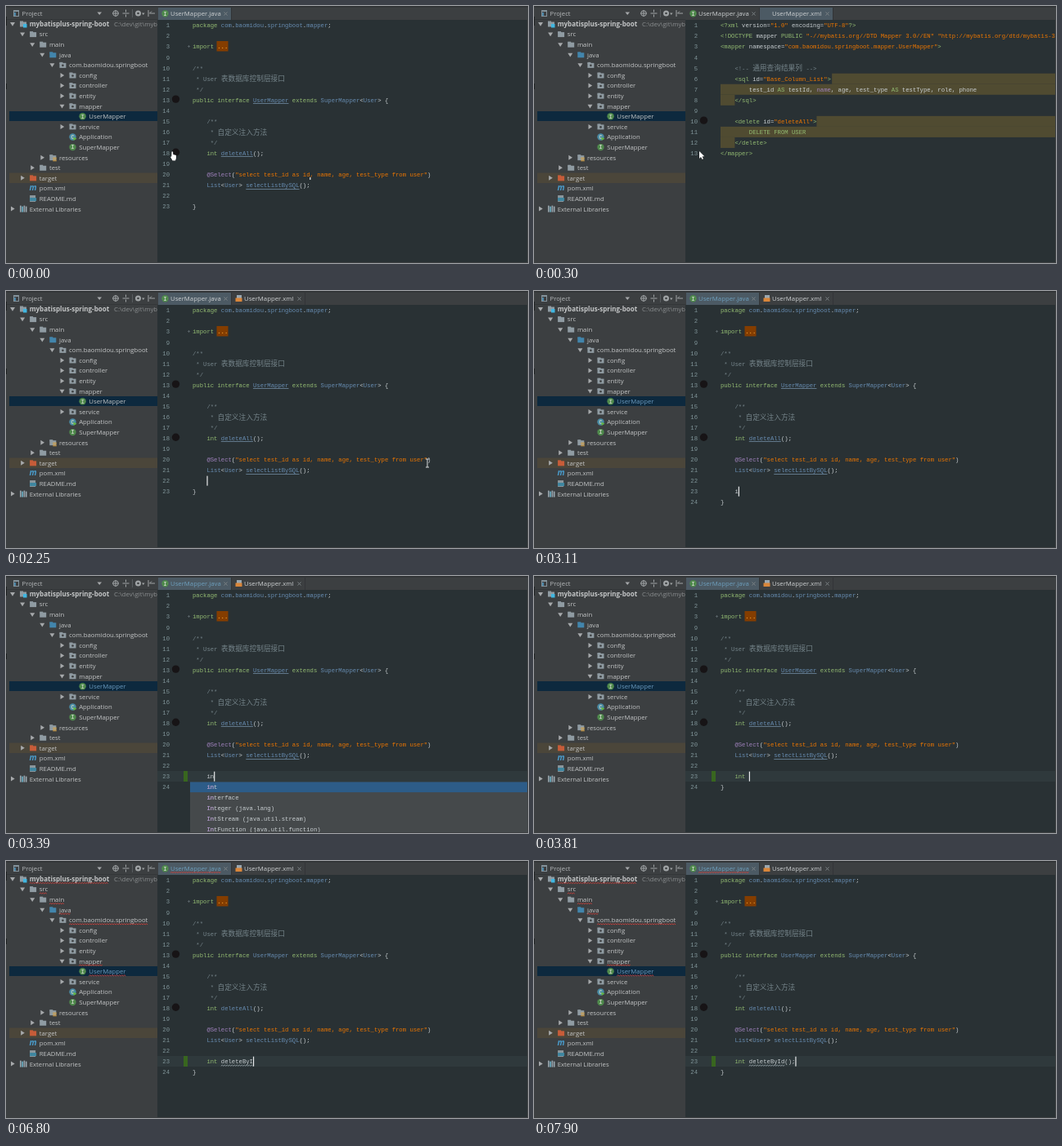
These frames come from a looping animation (638x315 px, 8000 ms). An HTML page with a canvas:

```html
<!DOCTYPE html>
<html lang="en">
<head>
<meta charset="utf-8">
<style>
html, body { margin: 0; width: 100%; height: 100%; overflow: hidden; background: #293134; }
canvas { display: block; }
</style>
</head>
<body>
<canvas id="stage" width="638" height="315"></canvas>
<script>
const ctx = document.getElementById('stage').getContext('2d');
const LOOP = 8000, CHAR = 4.35, LEFT = 228, ROW = 13.04, TREE_ROW = 12.59;
const MONO = '7.25px "Liberation Mono", monospace';
const CJK = '8.7px "Noto Sans CJK SC", "Noto Sans CJK", sans-serif';
const UI = '7.75px "Open Sans", sans-serif';
const UI_BOLD = 'bold 8px "Open Sans", sans-serif';
const COLORS = { w: '#c9cfd2', k: '#93bb72', s: '#ec7600', c: '#75848a', a: '#a082bd', g: '#81969a', t: '#678cb1' };

// "§x" switches to colour x
const JAVA = [
  '§kpackage §tcom§w.§tbaomidou§w.§tspringboot§w.§tmapper§w;', '', '§kimport', '',
  '§c/**', '§c * User 表数据库控制层接口', '§c */',
  '§kpublic interface §tUserMapper §kextends §tSuperMapper§w<§tUser§w> {', '',
  '§c    /**', '§c     * 自定义注入方法', '§c     */',
  '§k    int §tdeleteAll§w();', '',
  '§a    @Select§w(§s"select test_id as id, name, age, test_type from user"§w)',
  '§t    List§w<§tUser§w> §tselectListBySQL§w();', ''
];
const XML = [
  '§k<?xml§w version=§s"1.0"§w encoding=§s"UTF-8"§k?>',
  '§k<!DOCTYPE§w mapper §kPUBLIC §s"-//mybatis.org//DTD Mapper 3.0//EN" "http://mybatis.org/dtd/mybatis-3-mapper.dtd"§k>',
  '§k<mapper§w namespace=§s"com.baomidou.springboot.mapper.UserMapper"§k>', '',
  '§c    <!-- 通用查询结果列 -->',
  '§k    <sql§w id=§s"Base_Column_List"§k>',
  '§w        test_id §kAS§w testId, §aname§w, age, test_type §kAS§w testType, role, phone',
  '§k    </sql>', '',
  '§k    <delete§w id=§s"deleteAll"§k>',
  '§k        DELETE FROM USER',
  '§k    </delete>', '§k</mapper>'
];
// name, depth, arrow (v open, > closed), icon
const TREE = [
  ['mybatisplus-spring-boot', 0, 'v', 'module'], ['src', 1, 'v', 'folder'], ['main', 2, 'v', 'folder'],
  ['java', 3, 'v', 'source'], ['com.baomidou.springboot', 4, 'v', 'package'], ['config', 5, '>', 'package'],
  ['controller', 5, '>', 'package'], ['entity', 5, '>', 'package'], ['mapper', 5, 'v', 'package'],
  ['UserMapper', 6, '', 'interface'], ['service', 5, '>', 'package'], ['Application', 5, '', 'class'],
  ['SuperMapper', 5, '', 'interface'], ['resources', 3, '>', 'resources'], ['test', 2, '>', 'folder'],
  ['target', 1, '>', 'target'], ['pom.xml', 1, '', 'maven'], ['README.md', 1, '', 'markdown'],
  ['External Libraries', 0, '>', 'library']
];
const BROKEN_ROWS = [0, 1, 2, 3, 4, 8, 9];

const TYPED = [
  [0, ''], [3110, 'i'], [3390, 'in'], [3540, 'int'], [3810, 'int '], [4080, 'int d'], [4210, 'int de'],
  [4360, 'int del'], [4520, 'int dele'], [4660, 'int delet'], [4780, 'int delete'], [4940, 'int deleteB'],
  [5470, 'int delete'], [5900, 'int deleteB'], [6280, 'int deleteBy'], [6680, 'int deleteByI'],
  [7100, 'int deleteById'], [7510, 'int deleteById()'], [7900, 'int deleteById();']
];
const POINTER = [
  [0, 'hand', 201, 178], [150, 'arrow', 202, 178], [690, 'arrow', 202, 166], [810, 'arrow', 202, 149],
  [930, 'hand', 201, 136], [1330, 'beam', 290, 167], [1460, 'beam', 390, 187], [1590, 'beam', 475, 202],
  [1710, 'beam', 515, 211], [2810, 'none', 0, 0]
];
const at = (steps, t) => steps.filter(s => s[0] <= t).pop();

const rowY = row => 24 + row * ROW;
const colX = col => LEFT + col * CHAR;

function rect(color, x, y, w, h) {
  ctx.fillStyle = color;
  ctx.fillRect(x, y, w, h);
}
function text(str, x, y, color, font = UI, align = 'left') {
  ctx.font = font;
  ctx.fillStyle = color;
  ctx.textAlign = align;
  ctx.fillText(str, x, y);
}
function disc(color, x, y, r) {
  ctx.fillStyle = color;
  ctx.beginPath();
  ctx.arc(x, y, r, 0, 7);
  ctx.fill();
}
function shape(points, fill, stroke) {
  ctx.beginPath();
  points.forEach(([x, y]) => ctx.lineTo(x, y));
  ctx.closePath();
  if (stroke) { ctx.strokeStyle = stroke; ctx.lineWidth = 1; ctx.stroke(); }
  ctx.fillStyle = fill;
  ctx.fill();
}
function line(color, ...points) {
  ctx.strokeStyle = color;
  ctx.lineWidth = 1;
  ctx.beginPath();
  points.forEach(([x, y]) => ctx.lineTo(x, y));
  ctx.stroke();
}
function squiggle(x, y, w, color = '#c0413d') {
  const points = [];
  for (let i = 0; i <= w; i += 1.5) points.push([x + i, y + (i / 1.5 % 2 ? -0.6 : 0.6)]);
  line(color, ...points);
}
function code(source, row, col = 0) {
  let x = colX(col), color = COLORS.w;
  source.split(/(§.)/).forEach(part => {
    if (part[0] === '§') { color = COLORS[part[1]]; return; }
    for (const run of part.match(/[\u2e80-\uffff]+|[^\u2e80-\uffff]+/g) || []) {
      const wide = run.charCodeAt(0) > 0x2e80;
      text(run, x, rowY(row) + (wide ? 3.2 : 2.4), color, wide ? CJK : MONO);
      x += run.length * CHAR * (wide ? 2 : 1);
    }
  });
}
function caret(col, row) {
  rect('#e8eaec', colX(col), rowY(row) - 6, 1.2, 12);
}
function underline(col, length, row) {
  rect('#62798c', colX(col), Math.round(rowY(row) + 4), length * CHAR, 1);
}

function icon(kind, x, y) {
  const folder = color => {
    rect(color, x - 4, y - 3.5, 4, 2);
    rect(color, x - 4, y - 2.5, 8, 6);
  };
  const letter = (color, ch) => {
    disc(color, x, y, 4.2);
    text(ch, x, y + 2.4, '#c3d0c0', 'bold 6.5px "Liberation Mono", monospace', 'center');
  };
  if (kind === 'interface') letter('#4f8a4c', 'I');
  else if (kind === 'class') {
    letter('#4a8ba5', 'C');
    shape([[x + 1, y], [x + 5, y + 2.2], [x + 1, y + 4.5]], '#62b543');
  } else if (kind === 'maven') text('m', x, y + 3, '#4a9bcb', 'italic bold 10px "Open Sans", sans-serif', 'center');
  else if (kind === 'markdown') {
    rect('#8b979d', x - 4, y - 4, 7, 8);
    rect('#3e86a0', x - 4, y - 1, 8, 4);
  } else if (kind === 'library') {
    ['#9aa7b0', '#6bb3c9', '#9aa7b0', '#9aa7b0'].forEach((c, i) => rect(c, x - 4 + i * 2.3, y - 4 + i % 2, 1.6, 8 - i % 2));
  } else {
    folder({ source: '#4285ac', target: '#c75c39' }[kind] || '#8f9ba2');
    if (kind === 'module') rect('#40b6e0', x, y, 4.5, 4.5);
    if (kind === 'package') disc('#3c3f41', x, y + 0.5, 1.3);
    if (kind === 'resources') [0, 1.8, 3.6].forEach(d => rect('#d9a343', x, y + d, 4.5, 1));
  }
}

function drawTree(t) {
  ctx.save();
  ctx.beginPath();
  ctx.rect(0, 0, 185, 315);
  ctx.clip();
  rect('#3c3f41', 0, 0, 185, 315);
  rect('#2f3234', 0, 0, 185, 1.5);
  rect('#323537', 0, 16, 185, 0.8);
  rect('#1d1f20', 0, 13, 1, 11);
  rect('#1d1f20', 0, 95, 1, 7);
  rect('#84929a', 9, 5, 7, 8);
  rect('#3c3f41', 10, 7, 5, 5);
  rect('#4a86a8', 10, 8, 2, 4);
  text('Project', 19.5, 12, '#b7babc');
  shape([[111.5, 7.5], [117, 7.5], [114.2, 11]], '#a5a8aa');
  const tool = '#a0a4a6';
  ctx.strokeStyle = tool;
  ctx.lineWidth = 1;
  ctx.beginPath();
  ctx.arc(134, 9, 3.3, 0, 7);
  ctx.stroke();
  line(tool, [130, 9], [138, 9]);
  line(tool, [134, 5], [134, 13]);
  line(tool, [142.5, 9], [150.5, 9]);
  line(tool, [146.5, 4.5], [146.5, 7.5]);
  line(tool, [146.5, 10.5], [146.5, 13.5]);
  line('#595d60', [154.5, 4], [154.5, 14]);
  disc(tool, 161.5, 9, 3.5);
  disc('#3c3f41', 161.5, 9, 1.3);
  shape([[166, 8.5], [169.5, 8.5], [167.8, 11]], tool);
  line(tool, [174, 5], [174, 13]);
  line(tool, [182, 9], [175.5, 9], [178, 6.5]);

  rect('#0d293e', 4, 129, 181, 12);
  rect('#4b463a', 4, 204.5, 181, 12.5);
  TREE.forEach(([name, depth, arrow, kind], i) => {
    const x = 12.1 * depth, y = 22 + i * TREE_ROW;
    if (arrow === 'v') shape([[x + 5, y - 2], [x + 11, y - 2], [x + 8, y + 2.7]], '#a6a9ab');
    if (arrow === '>') shape([[x + 6, y - 3], [x + 10.7, y], [x + 6, y + 3]], '#a6a9ab');
    icon(kind, x + 21, y);
    const color = i === 9 && t >= 2960 ? '#6b9bc0' : '#c3c5c6';
    text(name, x + 28.7, y + 2.9, color, i ? UI : UI_BOLD);
    if (t >= 6680 && BROKEN_ROWS.includes(i)) squiggle(x + 28.7, y + 5, ctx.measureText(name).width);
  });
  text('C:\\dev\\git\\mybatisplus', 132, 24.9, '#8a8d8f');
  ctx.restore();
}

function drawTabs(t, xmlOpen) {
  rect('#3c3f41', 185, 0, 453, 17);
  rect('#2f3234', 185, 0, 453, 1.5);
  const tab = (x, w, active, label, color) => {
    if (active) rect('#4c5a64', x, 2, w, 15);
    text(label, x + 15, 12, color);
    const cx = x + w - 6.5;
    line('#7b8285', [cx - 2, 7.5], [cx + 2, 11.5]);
    line('#7b8285', [cx - 2, 11.5], [cx + 2, 7.5]);
    rect('#303335', x + w, 2, 0.8, 15);
  };
  tab(186, 89, !xmlOpen, 'UserMapper.java', t >= 2810 ? '#6d9fbd' : '#cdd0d2');
  icon('interface', 194.5, 9.3);
  if (t >= 6680) squiggle(201, 14, 62);
  if (t < 300) return;
  tab(276, 89, xmlOpen, 'UserMapper.xml', '#cdd0d2');
  if (t >= 420) {
    rect('#9aa7b0', 282, 5, 6, 8);
    rect('#d9863a', 280.5, 8.5, 8, 4.5);
  }
}

function lineNumber(n, row) {
  text(n, 200, rowY(row) + 2.4, COLORS.g, MONO, 'right');
}
const marker = row => disc('#171416', 207.5, rowY(row) - 1.2, 4.7);

function drawXml() {
  const injected = '#504b31';
  [[5, 31.3], [9, 27]].forEach(([row, col]) => {
    const top = rowY(row) - 6.5;
    rect(injected, colX(col), top, 638, ROW);
    rect(injected, LEFT, top + ROW, 410, ROW);
    rect(injected, LEFT, top + 2 * ROW, 4 * CHAR, ROW);
  });
  XML.forEach((source, row) => { lineNumber(row + 1, row); code(source, row); });
  marker(9);
}

function drawPopup(typed) {
  const items = ['int', 'interface', 'Integer (java.lang)', 'IntStream (java.util.stream)', 'IntFunction (java.util.function)'];
  rect('#45494b', 225, 252.5, 413, 63);
  rect('#2d5c88', 225, 252.5, 413, 12.6);
  items.forEach((item, i) => {
    const row = 18 + i;
    code('§w' + item, row, 4);
    code('§a' + item.slice(0, typed.length), row, 4);
  });
}

function drawJava(t) {
  const added = t >= 2810, typed = at(TYPED, t)[1], last = added ? 18 : 17;
  if (t >= 3230) {
    rect('#2f393c', 185, 239, 453, 13);
    rect('#38661f', 217, 239, 5, 13);
  }
  for (let row = 0; row <= last; row++) lineNumber(row < 3 ? row + 1 : row + 6, row);
  if (t >= 1460 && t < 2250) rect('#3b474c', colX(8), rowY(12) - 6, 9 * CHAR, 12);
  JAVA.forEach((source, row) => code(source, row));
  rect('#843d00', 257.5, 43, 14, 12.5);
  text('...', 258.2, rowY(2) + 2.4, '#f0a030', 'bold ' + MONO);
  line('#555f63', [222, 49.5], [225, 49.5]);
  line('#555f63', [223.5, 48], [223.5, 51]);
  marker(7);
  marker(12);
  if (t < 5900) {
    underline(17, 10, 7);
    underline(8, 9, 12);
    underline(15, 15, 15);
  }
  if (t >= 4520 && t < 5900) rect('#5d6568', colX(8), rowY(17) - 6, 4 * CHAR, 12);
  code(typed.replace(/^int ?/, '§k$&§w'), 17, 4);
  if (t >= 4520) squiggle(colX(8), rowY(17) + 5, (t < 5900 ? 4 : Math.min(typed.length - 4, 10)) * CHAR, '#8c979c');
  code('}', last);
  if (t < 300) rect('#f0f0f0', 371.2, 210, 1.2, 3);
  else if (t < 1850) caret(8, 12);
  else if (!added) caret(4, 16);
  else caret(4 + typed.length, 17);
  if (t >= 3230 && t < 3810) drawPopup(typed);
}

function drawPointer(t) {
  const [, kind, x, y] = at(POINTER, t);
  ctx.save();
  ctx.translate(x, y);
  if (kind === 'arrow') shape([[0, 0], [0, 9], [2, 7], [3.6, 10], [5, 9.3], [3.6, 6.5], [6.3, 6.3]], '#fff', '#1b1f21');
  if (kind === 'hand') shape([[1.5, 0.5], [3, 0.5], [3.3, 4], [7, 5], [7, 8.5], [6, 11.5], [2.5, 11.5], [0, 7], [1.3, 6.3]], '#fff', '#1b1f21');
  if (kind === 'beam') {
    line('#d8dadb', [0, -5], [0, 5]);
    line('#d8dadb', [-2, -5], [2, -5]);
    line('#d8dadb', [-2, 5], [2, 5]);
  }
  ctx.restore();
}

function draw(now) {
  const t = now % LOOP, xmlOpen = t >= 300 && t < 1210;
  rect('#293134', 0, 0, 638, 315);
  if (xmlOpen) drawXml(); else drawJava(t);
  drawTabs(t, xmlOpen);
  drawTree(t);
  rect('#3c3f41', 185, 314, 453, 1);
  rect('#3c3f41', 637, 17, 1, 298);
  drawPointer(t);
  requestAnimationFrame(draw);
}
requestAnimationFrame(draw);
</script>
</body>
</html>
```
